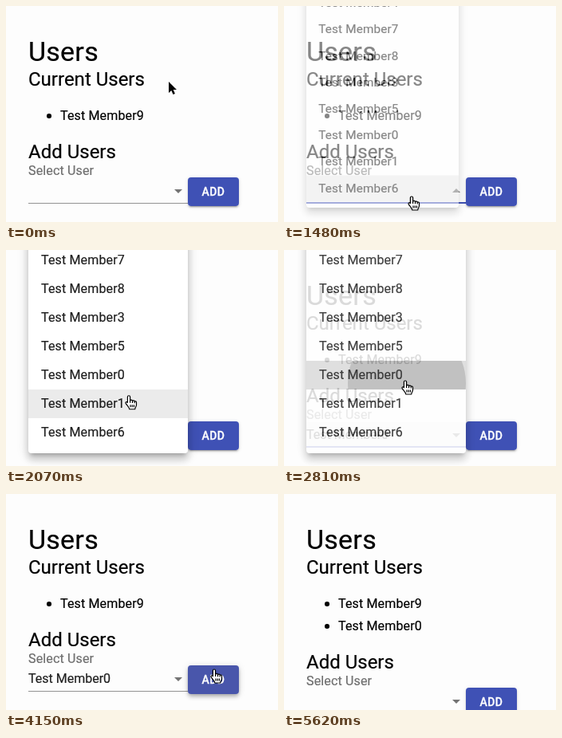
Write an HTML page that moves like this. It is 341 by 271 pixels and loops after 6.82 s.

```html
<!DOCTYPE html>
<html lang="en">
<head>
<meta charset="utf-8">
<title>Users</title>
<style>
html, body { margin: 0; width: 100%; height: 100%; overflow: hidden; }
body { position: relative; background: #fdfdfd; color: #000; font: 16px Roboto, sans-serif; -webkit-text-stroke: .2px; }
div, svg { position: absolute; white-space: pre; }
.h4 { left: 28px; top: 37px; font-size: 34px; line-height: 40px; letter-spacing: .00735em; }
.h5 { left: 28px; font-size: 24px; line-height: 32px; }
.body { letter-spacing: .00938em; }
.item { left: 68px; line-height: 27px; }
.item::before { content: ""; position: absolute; left: -17px; top: 11px; width: 5.6px; height: 5.6px; border-radius: 50%; background: #000; }
#lower { left: 0; top: 0; width: 341px; height: 271px; }
.label { left: 28px; top: 194px; line-height: 25px; color: rgba(0,0,0,.54); }
#select { left: 28px; top: 216px; width: 200px; height: 32px; }
#value { left: 0; top: 0; line-height: 31px; color: rgba(0,0,0,.87); }
#line { left: 0; bottom: 0; width: 100%; }
#focusBar { left: 0; bottom: 0; width: 100%; height: 2px; background: #3f51b5; }
#arrow { left: 176px; top: 4px; fill: rgba(0,0,0,.54); }
#button, #buttonShadow { left: 228px; top: 215px; width: 64px; height: 36px; border-radius: 4px; }
#button { overflow: hidden; color: #fff; font-size: 14px; font-weight: 500; line-height: 36px;
  letter-spacing: .02857em; text-align: center; -webkit-text-stroke: .3px; }
.ripple { border-radius: 50%; }
#menu { left: 28px; top: -85px; width: 200px; height: 340px; border-radius: 4px; background: #fff;
  color: rgba(0,0,0,.87); transform-origin: 0 314px;
  box-shadow: 0 5px 5px -3px rgba(0,0,0,.2), 0 8px 10px 1px rgba(0,0,0,.14), 0 3px 14px 2px rgba(0,0,0,.12); }
.row { left: 0; width: 184px; height: 36px; padding-left: 16px; line-height: 35px; overflow: hidden; }
#cursor { left: 0; top: 0; overflow: visible; }
</style>
</head>
<body>
<div class="h4">Users</div>
<div class="h5" style="top:76px">Current Users</div>
<div class="body item" style="top:124px" data-member="9"></div>
<div class="body item" style="top:152px" data-member="0" id="added"></div>
<div id="lower">
  <div class="h5" style="top:167px">Add Users</div>
  <div class="body label">Select User</div>
  <div id="select">
    <div id="value" data-member="0"></div>
    <svg id="arrow" width="24" height="24"><path d="M7 10l5 5 5-5z"/></svg>
    <div id="line"></div>
    <div id="focusBar"></div>
  </div>
  <div id="buttonShadow"></div>
  <div id="button">ADD<div class="ripple" id="buttonRipple" style="background:#fff"></div></div>
</div>
<div id="menu"></div>
<svg id="cursor" width="1" height="1">
  <path id="pointer" d="M0 0v14l3.3-3 2.2 5 2.4-1-2.2-5h4.3z" fill="#000" stroke="#fff" stroke-width="1.2" paint-order="stroke"/>
  <g id="hand" stroke="#000" stroke-width="1.2" stroke-linejoin="round">
    <path fill="#fff" d="M-1.6 1.5c0-2 3.2-2 3.2 0v4.6c.6-1 2.8-.9 2.9.5.7-.9 2.6-.6 2.7.7.9-.7 2.3-.1 2.3 1.2v3c0 2-1.6 3-1.8 5.5h-6.9c-.3-2.2-2.5-4.2-4.4-6.8-1.3-1.9.7-3.2 2-1.7z"/>
    <path fill="none" d="M1.6 6v3M4.5 6.8v2.4M7.2 7.5v2M2 11.5v3M4.2 11.5v3M6.4 11.5v3"/>
  </g>
</svg>
<script>
const LOOP = 6820;
const STEP = 148; // the picture refreshes at this interval
const ROW = 36;
const FOCUS = 1180, OPEN = 1381, ROW_PRESS = 2605, CHOOSE = 2750, BUTTON_PRESS = 3830, ADDED = 4290;

const START = { x: 204, y: 95 };
const MOVES = [
  { start: 148, duration: 592, x: 160, y: 239 },  // to the select
  { start: 1776, duration: 592, x: 152, y: 164 }, // up the menu
  { start: 2960, duration: 520, x: 261, y: 220 }, // to the button
  { start: 5270, duration: 354, x: 305, y: 300 }, // off the stage
];

const el = Object.fromEntries([...document.querySelectorAll("[id]")].map(e => [e.id, e]));
const memberName = n => `Test Member${n}`;
document.querySelectorAll("[data-member]").forEach(e => e.textContent = memberName(e.dataset.member));

const rows = [..."247835016"].map((n, i) => {
  const row = document.createElement("div");
  row.className = "row body";
  row.style.top = 8 + i * ROW + "px";
  row.textContent = memberName(n);
  el.menu.append(row);
  return row;
});
const chosenRow = rows[6];
const rowRipple = document.createElement("div");
rowRipple.className = "ripple";
rowRipple.style.background = "#000";
chosenRow.append(rowRipple);

const clamp = v => Math.min(1, Math.max(0, v));

// cubic-bezier(.4, 0, .2, 1)
function ease(x) {
  x = clamp(x);
  let low = 0, high = 1;
  for (let i = 0; i < 20; i++) {
    const s = (low + high) / 2, r = 1 - s;
    if (1.2 * r * r * s + .6 * r * s * s + s ** 3 < x) low = s; else high = s;
  }
  return low * low * (3 - 2 * low);
}
const progress = (t, start, duration) => ease((t - start) / duration);
const show = (e, on) => e.style.display = on ? "" : "none";
const inside = (p, left, top, right, bottom) => p.x >= left && p.x < right && p.y >= top && p.y < bottom;

function cursorAt(t) {
  return MOVES.reduce((from, to) => {
    const p = 1 - (1 - clamp((t - to.start) / to.duration)) ** 2;
    return { x: from.x + (to.x - from.x) * p, y: from.y + (to.y - from.y) * p };
  }, START);
}

function setRipple(e, x, y, radius, opacity) {
  Object.assign(e.style, { left: x - radius + "px", top: y - radius + "px",
    width: 2 * radius + "px", height: 2 * radius + "px", opacity });
}

function drawMenu(t, y) {
  const closing = t >= CHOOSE;
  const start = closing ? CHOOSE : OPEN, duration = closing ? 300 : 275;
  const fade = progress(t, start, duration);
  const alpha = closing ? 1 - fade : fade;
  const grow = closing
    ? 1 - progress(t, start + duration / 3, duration * 2 / 3)
    : progress(t, start, duration * 2 / 3);
  const visible = alpha > .005;
  show(el.menu, visible);
  el.menu.style.opacity = alpha;
  el.menu.style.transform = `scale(${.75 + .25 * grow}, ${.5625 + .4375 * grow})`;
  const hovered = Math.floor((y + 77) / ROW);
  rows.forEach((row, i) => {
    const shade = closing ? (row === chosenRow ? .14 : 0) : (i === hovered ? .08 : 0);
    row.style.background = `rgba(0,0,0,${shade})`;
  });
  setRipple(rowRipple, 126, 28, 131 * progress(t, ROW_PRESS, 550), .16);
  return visible;
}

function drawSelect(t, hovered) {
  const bar = progress(t, FOCUS, 200) - progress(t, BUTTON_PRESS, 200);
  const filled = t >= CHOOSE && t < BUTTON_PRESS;
  el.select.style.background = filled ? "rgba(0,0,0,.06)" : "none";
  el.focusBar.style.transform = `scaleX(${bar})`;
  el.line.style.height = hovered ? "2px" : "1px";
  el.line.style.background = `rgba(0,0,0,${hovered ? .87 : .42})`;
  el.arrow.style.transform = t >= OPEN && t < CHOOSE ? "rotate(180deg)" : "none";
  show(el.value, t >= CHOOSE && t < ADDED);
}

function drawButton(t, hovered) {
  const pressed = t >= BUTTON_PRESS && t < ADDED;
  el.button.style.background = hovered && t > 3500 ? "#303f9f" : "#3f51b5";
  el.buttonShadow.style.boxShadow = pressed
    ? "0 2px 4px -1px rgba(0,0,0,.2), 0 4px 5px 0 rgba(0,0,0,.14), 0 1px 10px 0 rgba(0,0,0,.12)"
    : "0 3px 1px -2px rgba(0,0,0,.2), 0 2px 2px 0 rgba(0,0,0,.14), 0 1px 5px 0 rgba(0,0,0,.12)";
  setRipple(el.buttonRipple, 33, 6, 80 * progress(t, BUTTON_PRESS, 550), pressed ? .12 : 0);
}

function render(time) {
  const t = Math.floor((time + 8) / STEP) * STEP;
  const cursor = cursorAt(t);
  const added = t >= ADDED;
  const menuOpen = drawMenu(t, cursor.y);
  const overSelect = !added && inside(cursor, 28, 216, 228, 248);
  const overButton = !added && inside(cursor, 228, 215, 292, 251);

  drawSelect(t, overSelect);
  drawButton(t, overButton);
  show(el.added, added);
  el.lower.style.transform = added ? "translateY(28px)" : "none";

  const hand = menuOpen || overSelect || overButton;
  show(el.hand, hand);
  show(el.pointer, !hand);
  el.cursor.style.transform = `translate(${cursor.x}px, ${cursor.y}px)`;
}

const began = performance.now();
function frame() {
  render((performance.now() - began) % LOOP);
  requestAnimationFrame(frame);
}
frame();
</script>
</body>
</html>
```
